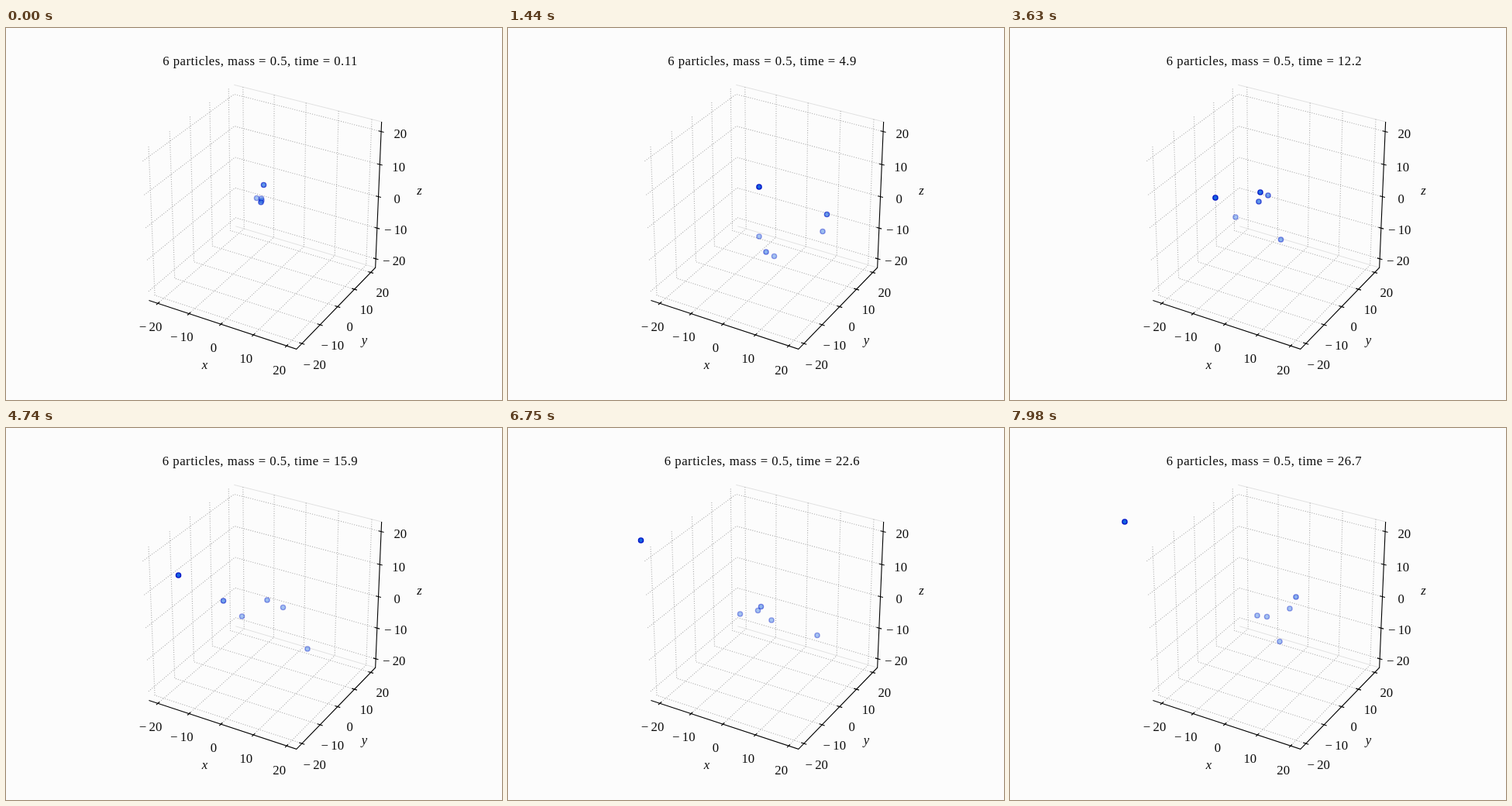
An HTML page with a canvas for the animation above (8000 ms loop, 640x480 px).

```html
<!DOCTYPE html>
<html lang="en">
<head>
<meta charset="utf-8">
<title>Particles</title>
<style>
  html, body { margin: 0; width: 100%; height: 100%; overflow: hidden; background: #fcfcfc; }
  canvas { display: block; }
</style>
</head>
<body>
<canvas id="stage" width="640" height="480"></canvas>
<script>
const ctx = document.getElementById('stage').getContext('2d');
const LOOP = 8000, STEP = 30;
const SERIF = '"Liberation Serif", "Noto Serif", serif';
const TICKS = [-20, -10, 0, 10, 20];

// Camera: 30 degrees up, turned by -60 degrees, ten units away.
const LIMIT = 22 * 25 / 24, UNIT = 0.55 / LIMIT, DISTANCE = 10, ZOOM = 1998;
const SIN60 = Math.sqrt(3) / 2;

function project([x, y, z]) {
  const right = SIN60 * x + y / 2;
  const away = y * SIN60 - x / 2;
  const up = away / 2 + SIN60 * z;
  const near = z / 2 - away * SIN60;
  const scale = ZOOM * UNIT / (DISTANCE - near * UNIT);
  return [333 + right * scale, 237.4 - up * scale];
}

// For each axis: its place at value t, moved outward by d, and its grid line at t.
const L = LIMIT;
const axes = [
  { name: 'x', at: (t, d) => [t, -L - d, -L - d], tick: (t, d) => [t, -L - d, -L],
    grid: t => [[t, L, L], [t, L, -L], [t, -L, -L]] },
  { name: 'y', at: (t, d) => [L + d, t, -L - d], tick: (t, d) => [L + d, t, -L],
    grid: t => [[-L, t, L], [-L, t, -L], [L, t, -L]] },
  { name: 'z', at: (t, d) => [L + d, L + d, t], tick: (t, d) => [L + d, L, t],
    grid: t => [[-L, -L, t], [-L, L, t], [L, L, t]] }
];

// Stage points each orbit passes at the beats; "near" is when the body comes
// closest to the viewer, for how long, and how much darker it gets.
const beats = [0, 48, 84, 121, 158, 225, 266];
const bodies = [
  { near: [200, 90, 2],
    path: [[329, 225], [333, 289], [332, 258.5], [265, 219], [222.5, 190], [171.5, 145], [148, 121]] },
  { near: [48, 55, 0.62],
    path: [[332.5, 202.5], [324, 205], [331.5, 209.5], [349.5, 273], [389, 285], [399, 267.5], [361, 233]] },
  { near: [107, 25, 0.28],
    path: [[323.5, 219.5], [324, 269], [334, 250], [333, 216], [357.5, 231.5], [340, 248], [348, 275.5]] },
  { near: [100, 55, 0.62],
    path: [[329.5, 220], [411.5, 240.5], [362.5, 239.5], [323, 212], [280.5, 223], [299.5, 240], [319, 242]] },
  { near: [102, 35, 0.4],
    path: [[330, 222.5], [406, 262.5], [358, 253], [321, 224], [337, 222], [322.5, 235.5], [331.5, 243.5]] },
  { near: [250, 50, 0.12],
    path: [[329, 224.5], [343.5, 294.5], [349, 262.5], [291, 244], [304.5, 243], [326.5, 230.5], [369, 218]] }
];

// Harmonic-mean tangent: zero at a turning point, steep at the opening burst.
function tangent(path, k, i) {
  const slope = j => (path[j + 1][k] - path[j][k]) / (beats[j + 1] - beats[j]);
  if (i === 0) return 5.5 * slope(0);
  if (i === beats.length - 1) return slope(i - 1);
  const p = slope(i - 1), q = slope(i);
  return p * q > 0 ? 2 * p * q / (p + q) : 0;
}

function place(path, n) {
  const i = Math.max(0, beats.findIndex(b => b >= n) - 1);
  const h = beats[i + 1] - beats[i], u = (n - beats[i]) / h;
  const s = u * u * (3 - 2 * u);
  return [0, 1].map(k => path[i][k] * (1 - s) + path[i + 1][k] * s
    + h * u * (1 - u) * (tangent(path, k, i) * (1 - u) - tangent(path, k, i + 1) * u));
}

const shade = ([peak, width, gain], n) =>
  Math.min(1, 0.38 + gain * Math.exp(-(((n - peak) / width) ** 2)));

function line(points, color, width, dash = []) {
  ctx.beginPath();
  for (const p of points) ctx.lineTo(...project(p));
  ctx.strokeStyle = color;
  ctx.lineWidth = width;
  ctx.setLineDash(dash);
  ctx.stroke();
  ctx.setLineDash([]);
}

function text(str, x, y, style = '') {
  ctx.font = `${style} 16.7px ${SERIF}`;
  ctx.fillStyle = '#0c0c0c';
  ctx.textAlign = 'center';
  ctx.fillText(str, x, y);
}

function drawAxes() {
  for (const z of [-L, L]) line([[-L, L, z], [L, L, z]], '#dedede', 0.9);
  for (const { grid } of axes)
    for (const t of TICKS) line(grid(t), '#b0b0b0', 1.11, [1.11, 1.83]);
  line([[-L, -L, -L], [L, -L, -L], [L, L, -L], [L, L, L]], '#000', 1.11);

  const pad = LIMIT / 6;
  for (const { name, at, tick } of axes) {
    for (const t of TICKS) {
      line([tick(t, -0.8), tick(t, 0.8)], '#000', 1.11);
      const [x, y] = project(at(t, pad));
      text((t < 0 ? '\u2212\u2009' : '') + Math.abs(t), x, y + 11.6);
    }
    const [x, y] = project(at(0, 2.2 * pad));
    text(name, x, y + 4, 'italic');
  }
}

function drawTitle(n) {
  const time = 0.11 + n * 0.1;
  ctx.letterSpacing = '0.5px';
  text(`6 particles, mass = 0.5, time = ${time.toFixed(time < 1 ? 2 : 1)}`, 328, 48.2);
  ctx.letterSpacing = '0px';
}

function drawBodies(n) {
  const dots = bodies.map(b => ({ at: place(b.path, n), alpha: shade(b.near, n) }));
  dots.sort((p, q) => p.alpha - q.alpha);
  for (const { at, alpha } of dots) {
    ctx.globalAlpha = alpha;
    ctx.beginPath();
    ctx.arc(...at, 3.1, 0, 2 * Math.PI);
    ctx.fillStyle = '#1464e0';
    ctx.fill();
    ctx.strokeStyle = '#0014c8';
    ctx.lineWidth = 1.39;
    ctx.stroke();
  }
  ctx.globalAlpha = 1;
}

const start = performance.now();
function draw() {
  const n = Math.floor(((performance.now() - start) % LOOP) / STEP);
  ctx.fillStyle = '#fcfcfc';
  ctx.fillRect(0, 0, 640, 480);
  drawAxes();
  drawTitle(n);
  drawBodies(n);
  requestAnimationFrame(draw);
}
draw();
</script>
</body>
</html>
```
